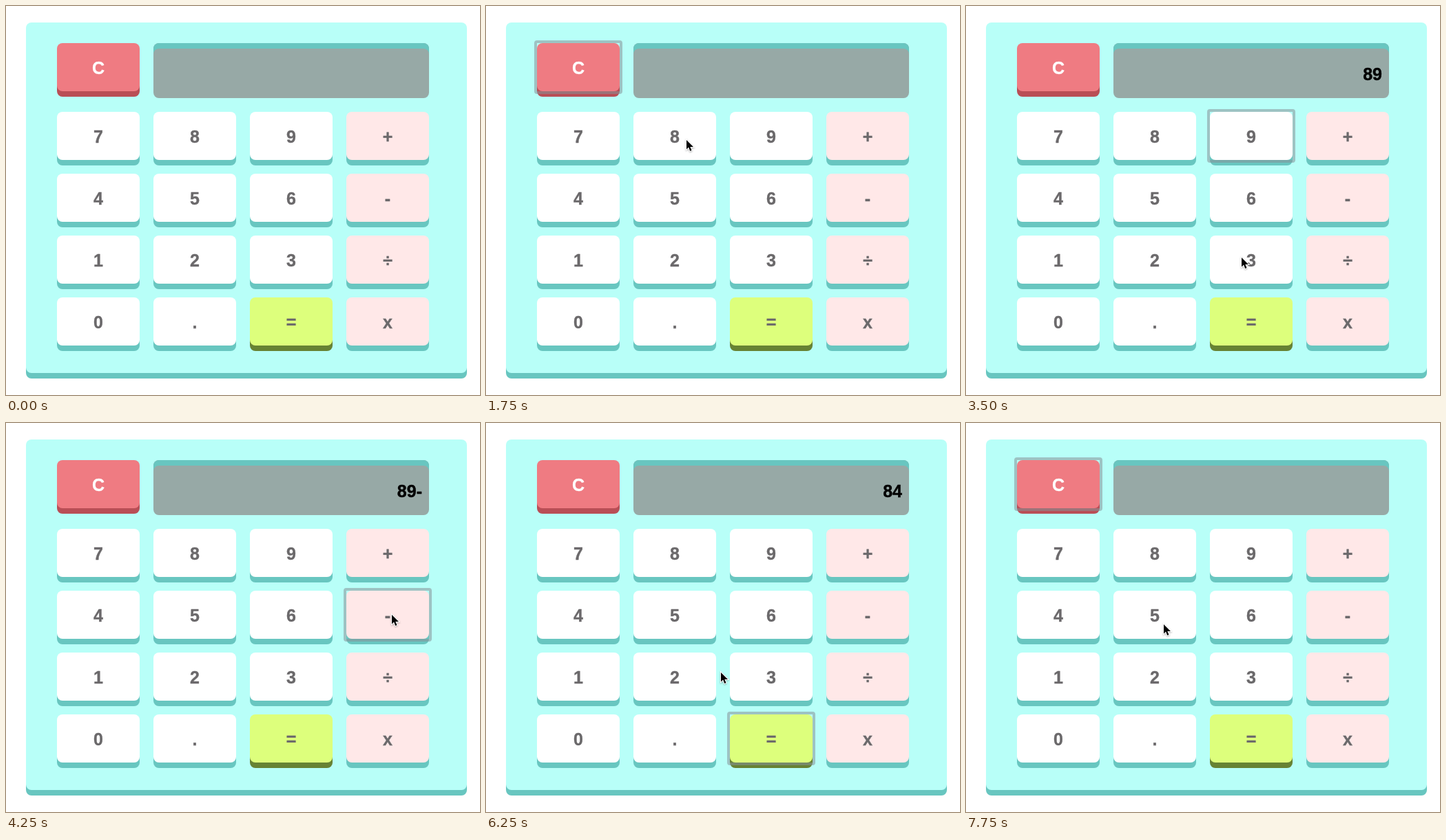
Recreate the animation shown at these times as an HTML page. Size 688x566 px, loop 8000 ms.

```html
<!DOCTYPE html>
<html lang="en">
<head>
<meta charset="utf-8">
<title>Calculator</title>
<style>
html, body { margin: 0; width: 100%; height: 100%; overflow: hidden; background: #fff; }
body { position: relative; font: bold 25px/72px "Liberation Sans", Arial, sans-serif; color: #6b696b; -webkit-text-stroke: .4px; }
div, svg { position: absolute; }
#panel { left: 29px; top: 24px; width: 640px; height: 510px; border-radius: 8px; background: #b8fff8; box-shadow: 0 8px #68c6c0; }
#display { left: 214px; top: 54px; width: 390px; height: 71px; padding: 9px 10px 0 0; border-radius: 8px; text-align: right; color: #000; background: #97a9a6; box-shadow: inset 0 8px #68c6c0; }
.key { width: 120px; height: 70px; border-radius: 8px; text-align: center; background: #fff; box-shadow: 0 8px #68c6c0; }
.op { background: #ffe8e8; }
.equals { background: #ddff7c; box-shadow: 0 8px #678233; }
.clear { color: #fff; background: #ef7b82; box-shadow: 0 8px #b94e56; }
.focus::after { content: ""; position: absolute; inset: -4px; border: 4px solid rgba(135, 146, 152, .55); border-radius: 4px; filter: blur(.7px); }
#cursor { left: 0; top: 0; overflow: visible; filter: drop-shadow(0 1px 1px rgba(0, 0, 0, .3)); }
</style>
</head>
<body>
<div id="panel"></div>
<div id="display"></div>
<svg id="cursor" width="12" height="18"><path d="M0 0V13.5L3.1 10.6L5.2 16L7.5 15L5.3 10H10Z" stroke="#fff" stroke-width="2" paint-order="stroke"/></svg>
<script>
const TICK = 250, TICKS = 32;
const display = document.getElementById('display');
const cursor = document.getElementById('cursor');
const keys = {};

function addKey(label, col, row) {
  const key = document.createElement('div');
  const kind = label === 'C' ? 'clear' : label === '=' ? 'equals' : col === 3 ? 'op' : '';
  key.className = 'key ' + kind;
  key.textContent = label;
  key.style.left = 74 + col * 140 + 'px';
  key.style.top = (row < 0 ? 54 : 154 + row * 90) + 'px';
  document.body.insertBefore(key, cursor);
  keys[label] = key;
}
addKey('C', 0, -1);
['789+', '456-', '123÷', '0.=x'].forEach((line, row) =>
  [...line].forEach((label, col) => addKey(label, col, row)));

// Places where the pointer rests; those with a key press it at that time, in ticks.
const stop = (time, x, y, key) => ({ time, x, y, key });
const stops = [
  stop(-.2, 322, 204), stop(2, 265, 204), stop(4.6, 140, 90, 'C'),
  stop(7.4, 291, 195, '8'), stop(9.8, 427, 195, '9'), stop(12.8, 400, 366),
  stop(16, 560, 279, '-'), stop(19, 262, 285, '5'), stop(22.8, 431, 490, '='),
  stop(27.5, 140, 80, 'C'), stop(31.8, 287, 293)
];
const presses = stops.filter(s => s.key);
const ARRIVE = .8, LEAVE = 1.2, RELEASE = .5;

function enter(text, key) {
  if (key === 'C') return '';
  if (key === '=') return String(text.split('-').reduce((a, b) => a - b));
  return text + key;
}

function pointerAt(tick) {
  const i = stops.findLastIndex(s => s.time <= tick + ARRIVE);
  const from = stops[i], to = stops[i + 1] || from;
  const travel = to.time - ARRIVE - from.time - LEAVE;
  const k = Math.min(1, Math.max(0, (tick - from.time - LEAVE) / travel));
  const ease = k * k * (3 - 2 * k);
  const mix = (a, b) => Math.round(a + (b - a) * ease);
  return [mix(from.x, to.x), mix(from.y, to.y)];
}

function draw(now) {
  const tick = Math.floor(now / TICK) % TICKS;
  const focus = presses.findLast(p => p.time <= tick)?.key;
  for (const label in keys) keys[label].classList.toggle('focus', label === focus);
  display.textContent = presses.filter(p => p.time + RELEASE <= tick)
    .reduce((text, p) => enter(text, p.key), '');
  const [x, y] = pointerAt(tick);
  cursor.style.transform = `translate(${x}px, ${y}px)`;
  cursor.style.visibility = tick ? 'visible' : 'hidden';
}

let start;
function loop(now) {
  start ??= now;
  draw(now - start);
  requestAnimationFrame(loop);
}
draw(0);
requestAnimationFrame(loop);
</script>
</body>
</html>
```
